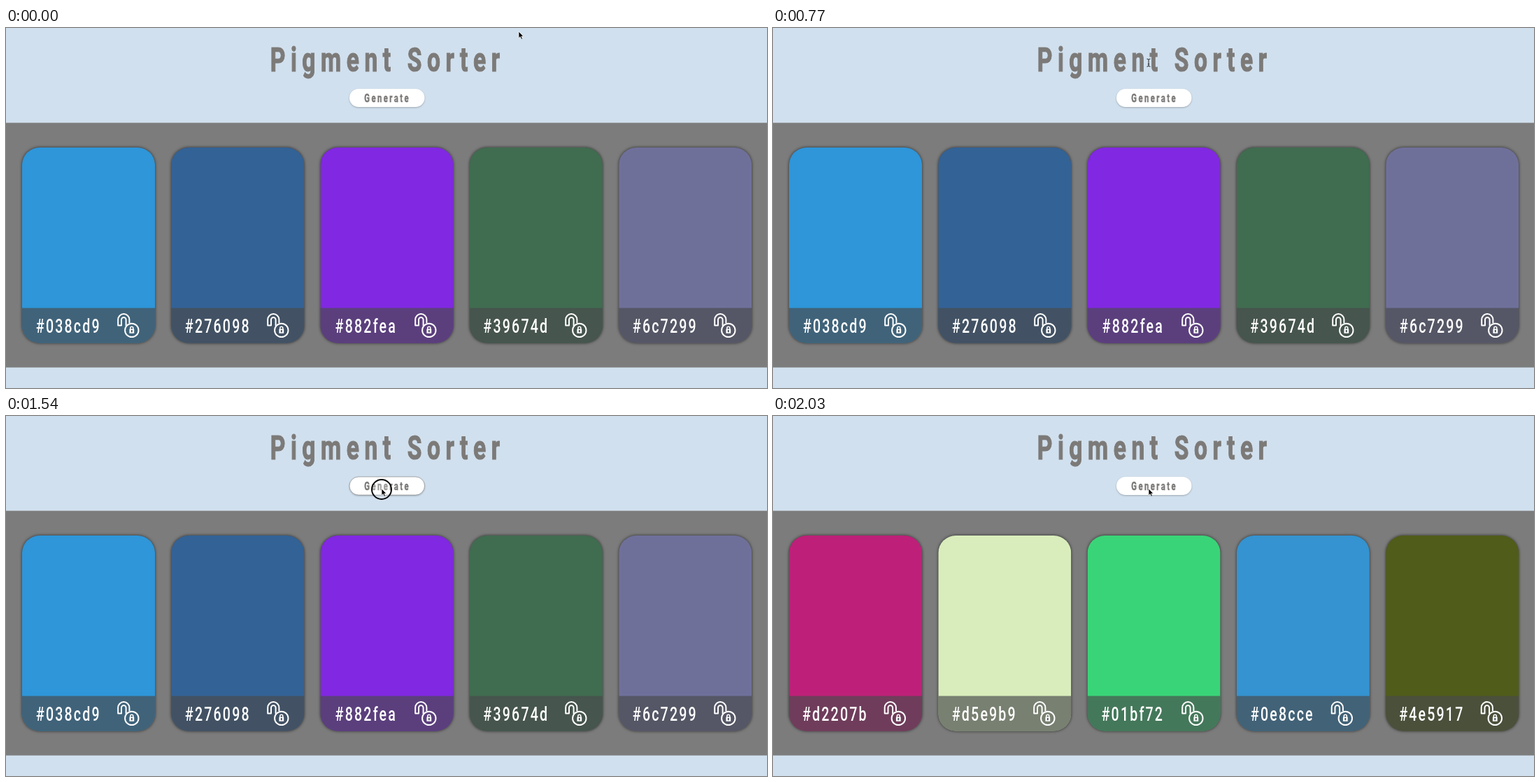
An HTML page that plays this animation: 1088x515 px, repeating every 2.1 s.

```html
<!DOCTYPE html>
<html lang="en">
<head>
<meta charset="utf-8">
<title>Pigment Sorter</title>
<style>
html, body { margin: 0; width: 100%; height: 100%; overflow: hidden; background: #d1e0ee; }
svg { display: block; width: 100vw; height: 100vh; }
text { font-family: Roboto, "Liberation Sans", sans-serif; text-anchor: middle; }
.title, .label { font-weight: 700; fill: #7c7a78; stroke: #7c7a78; }
.title { font-size: 48px; letter-spacing: 10.8px; stroke-width: 1.2px; }
.label { font-size: 16px; letter-spacing: 3.6px; stroke-width: .5px; }
.hex { font-size: 28px; font-weight: 500; letter-spacing: 3.1px; fill: #fff; }
.card { filter: drop-shadow(0 0 2px rgba(0, 0, 0, .65)); }
.button { filter: drop-shadow(0 1px 1px rgba(0, 0, 0, .25)); }
.line { fill: none; stroke: #fff; stroke-width: 2; stroke-linejoin: round; }
.thin { stroke-width: 1.5; }
</style>
</head>
<body>
<svg viewBox="0 0 1088 515" preserveAspectRatio="none">
  <defs>
    <clipPath id="round"><rect width="190" height="279.5" rx="25"/></clipPath>
    <g id="lock">
      <path class="line" d="M17.4 14V9.2a8.1 8.1 0 0 0-16.2 0V17.6H6V9.2a3.3 3.3 0 0 1 6.6 0V18"/>
      <circle class="line" cx="20.8" cy="24.4" r="9.7"/>
      <path class="line thin" d="M18.8 23v-1.8a2 2 0 0 1 4 0V23"/>
      <rect x="17.4" y="22.4" width="6.8" height="6.4" rx=".6" fill="#fff"/>
      <path d="M20.8 24v3.2" stroke="#4d5860" stroke-width="2"/>
    </g>
  </defs>
  <rect width="1088" height="515" fill="#d1e0ee"/>
  <rect y="135.6" width="1088" height="350" fill="#7c7c7c"/>
  <text class="title" transform="translate(545.6 62) scale(.7 1)">Pigment Sorter</text>
  <rect class="button" id="button" x="491" y="87" width="107.5" height="26" rx="13" fill="#fff" stroke-width=".5"/>
  <text class="label" transform="translate(545.2 106) scale(.7 1)">Generate</text>
  <g id="cards"></g>
  <circle id="ring" cx="537" cy="105" r="14" fill="#fff" fill-opacity=".25" stroke="#0b0b0b" stroke-width="2"/>
  <path id="arrow" d="M0 0V9.6L2.2 7.5 3.8 11.2 5.5 10.4 3.9 6.9H6.8Z" fill="#000" stroke="#fff" stroke-width=".7"/>
  <path id="beam" d="M-2.5-5.5Q0-5.5 0-4Q0-5.5 2.5-5.5M0-4V4M-2.5 5.5Q0 5.5 0 4Q0 5.5 2.5 5.5M-1.2 2H1.2" fill="none" stroke="#222"/>
</svg>
<script>
const LOOP = 2100, SWAP = 1610, PRESS = 1470;
const $ = id => document.getElementById(id);

// each entry: code, fill, text centre, lock x
const palettes = [
  [["#038cd9", "#2e96d9", 89, 159], ["#276098", "#336296", 302.5, 373],
   ["#882fea", "#8128e2", 514.5, 584], ["#39674d", "#406c50", 729, 799],
   ["#6c7299", "#6f709a", 942, 1012]],
  [["#d2207b", "#be2079", 88.5, 158.5], ["#d5e9b9", "#d9edbc", 302, 372],
   ["#01bf72", "#3ad478", 514, 584], ["#0e8cce", "#3493d0", 728, 797.5],
   ["#4e5917", "#505c19", 941.5, 1011.5]]
];

const card = ([code, fill, textX, lockX], i) => `
  <g class="card" transform="translate(${23 + i * 213.3} 171)">
    <g clip-path="url(#round)">
      <rect width="190" height="280" fill="${fill}"/>
      <rect y="229.5" width="190" height="51" fill="#4a4b4c" fill-opacity=".67"/>
    </g>
  </g>
  <text class="hex" transform="translate(${textX + .3} 436) scale(.7 1)">${code}</text>
  <use href="#lock" x="${lockX}" y="408"/>`;

$("cards").innerHTML = palettes.map(p => `<g>${p.map(card).join("")}</g>`).join("");
const sets = [...$("cards").children];

const show = (el, on) => el.setAttribute("visibility", on ? "visible" : "hidden");
const place = (el, x, y) => el.setAttribute("transform", `translate(${x} ${y})`);
const ease = (t, from, to) => {
  const p = Math.min(1, Math.max(0, (t - from) / (to - from)));
  return p * p * (3 - 2 * p);
};

function draw(ms) {
  const t = Math.floor((ms % LOOP) / 70) * 70;
  const swapped = t >= SWAP, pressed = t >= PRESS && t < SWAP;
  show(sets[0], !swapped);
  show(sets[1], swapped);
  show($("ring"), pressed);
  $("button").setAttribute("stroke", pressed ? "#666" : "none");

  const leaving = t < 210, onButton = t >= 1190;
  show($("arrow"), leaving || onButton);
  show($("beam"), t >= 630 && !onButton);
  if (leaving) place($("arrow"), 733, 5 - 20 * ease(t, 0, 210));
  else place($("arrow"), 537, 88 + 16 * ease(t, 1120, 1330));
  place($("beam"), 537, 43 + 19 * ease(t, 630, 980));
}

const start = performance.now();
(function tick() {
  draw(performance.now() - start);
  requestAnimationFrame(tick);
})();
</script>
</body>
</html>
```
